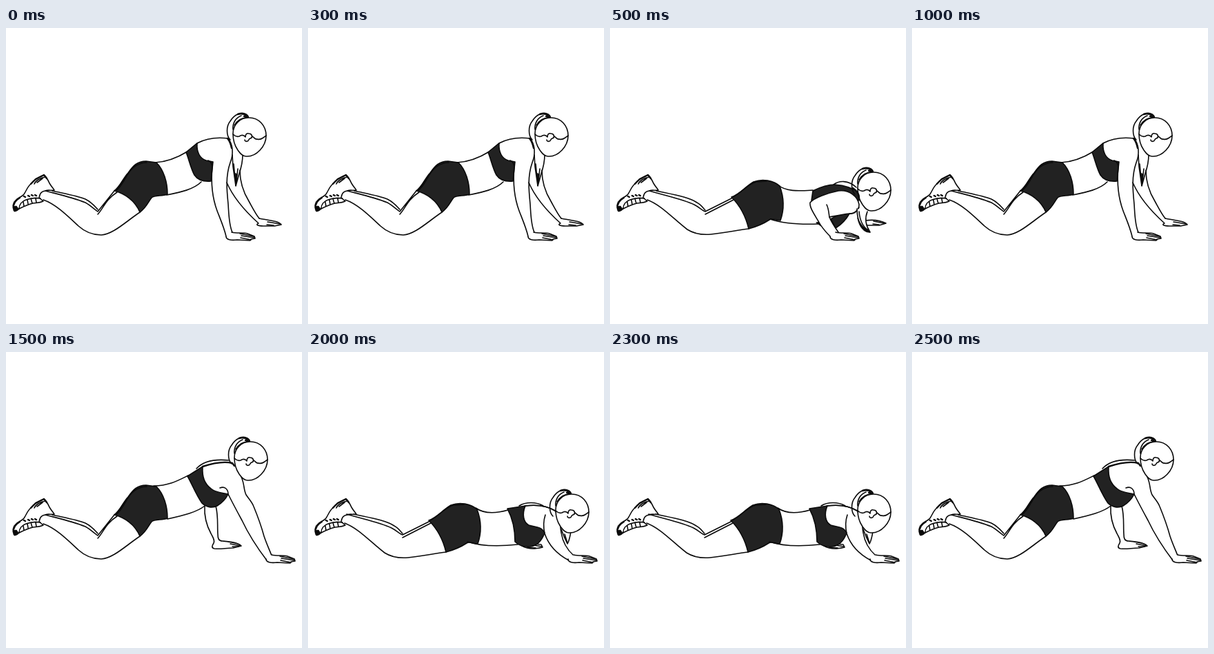
Animation, 429 px wide and 429 px high, one loop 3 s. Source, as an HTML page:

```html
<!DOCTYPE html>
<html lang="en">
<head>
<meta charset="utf-8">
<title>Kneeling push-up</title>
<style>
html, body { margin: 0; width: 100%; height: 100%; overflow: hidden; background: #fff; }
svg { display: block; width: 100vw; height: 100vh; }
path { fill: none; stroke: #0a0a0a; stroke-width: 1.6; stroke-linecap: round; stroke-linejoin: round; }
.skin { fill: #fff; }
.cloth { fill: #222; }
.ink { fill: #0a0a0a; stroke-width: 1; }
.bold { stroke-width: 2.4; }
</style>
</head>
<body>
<svg id="stage" viewBox="0 0 429 429"></svg>
<script>
const path = (d, kind = '') => `<path class="${kind}" d="${d}"/>`;
const move = (x, y, parts) => `<g transform="translate(${x} ${y})">${parts}</g>`;

const shoe =
  path('M12 265C9 259 10 253 14 250C18 245 23 245 26 241C30 235 31 230 36 226C40 220 48 216 55 213C59 216 60 219 63 225C66 230 68 232 70 235C65 236 61 234 57 236C50 237 49 241 48 246L54 251C48 254 44 253 39 254C31 256 25 259 19 262C16 265 14 266 12 265Z', 'skin') +
  path('M11 261C10 254 15 249 20 246M36 226L43 219L55 213L59 218', 'bold') +
  path('M19 262C19 256 23 251 29 249C37 246 44 246 50 247M41 226C43 221 50 217 57 216M45 224L53 218M26 258L25 252M32 255L31 249M38 254L36 247M44 253L43 247') +
  path('M26 244L28 245M32 243L34 244M37 242L39 243M42 242L44 243', 'bold') +
  path('M11 264L11 259L15 258L18 262L13 266Z', 'ink');

const hand =
  path('M319 302C319 307 326 308 335 307L354 308L355 306L361 305L360 302L350 298C343 296 335 298 327 296', 'skin') +
  path('M339 298L359 302M341 301L360 304M340 304L355 307');

const farHand =
  path('M366 283C361 285 365 287 373 287L389 287L399 285C396 280 384 279 367 276', 'skin') +
  path('M379 281L397 284M378 285L388 286');

const head =
  path('M325 162C319 156 319 142 325 135C331 125 341 121 348 125C351 127 352 129 351 131M329 147C328 138 333 130 341 127M331 141C335 134 342 130 349 130') +
  path('M336 125C342 123 348 125 351 131L345 128', 'bold') +
  path('M352 130C367 130 377 142 377 156C377 171 363 187 348 186C342 186 339 181 336 177C331 170 329 162 329 153C329 140 339 130 352 130Z', 'skin') +
  path('M329 154C332 157 335 158 338 157C341 155 344 154 347 158C347 154 349 152 352 153C357 153 358 159 354 160C351 161 352 164 350 164C348 165 346 164 346 162M357 157C360 159 361 162 364 161C369 163 373 159 377 156');

const legsHigh =
  path('M57 236C76 241 98 246 115 253C124 258 129 264 133 266L157 236M67 236C85 240 103 243 115 248C125 253 129 259 133 263M133 270C142 260 144 249 161 238') +
  path('M54 249C72 255 90 273 105 287C115 296 126 300 138 300C155 299 172 282 194 267') +
  path('M157 236C166 229 170 217 177 210C184 200 190 193 203 193L218 195C229 206 234 224 234 241C226 244 215 242 211 246C206 252 204 260 194 267C187 250 172 240 157 236Z', 'cloth') +
  path('M159 236C172 226 173 211 186 201C192 197 198 195 204 195');

const legsLow =
  path('M57 236C80 243 106 248 122 256C130 260 134 265 138 266L178 246M67 236C90 241 115 245 126 253C132 256 135 261 138 264M138 270L181 248') +
  path('M54 249C75 257 91 276 112 292C123 299 134 300 146 299C166 297 184 293 201 291') +
  path('M176 245C188 241 196 230 208 223C221 218 237 221 246 229C252 245 253 262 247 279C240 279 235 275 231 278C222 284 212 288 201 291C197 274 188 257 176 245Z', 'cloth') +
  path('M178 245C192 238 198 227 212 223L227 222');

const narrowHigh = shoe + legsHigh +
  path('M216 195C235 194 250 187 263 179L277 167C290 160 306 158 322 160M233 242C253 238 272 234 283 223') +
  path('M320 224C329 245 346 265 366 283M339 206C339 222 344 238 352 251C358 262 362 270 367 276') +
  farHand +
  path('M328 184L329 201L333 229L338 211C341 202 343 194 343 184M330 197L333 229L336 204') +
  path('M332 211L333 229L335 212Z', 'ink') +
  path('M261 180L277 167C276 180 281 189 290 192L300 194L297 222C285 223 277 219 273 213C268 204 265 190 261 180Z', 'cloth') +
  path('M319 302C316 289 311 278 306 265C299 246 297 222 299 201C299 196 297 194 293 192M322 160C329 169 330 183 325 195C318 215 320 235 322 255C323 270 323 285 328 296') +
  hand + head +
  path('M321 160C325 165 326 169 327 174', 'bold');

const narrowLow = shoe + legsLow +
  path('M243 227C255 238 276 236 294 235M232 277C253 284 277 285 302 284M324 227C332 221 345 220 357 231') +
  path('M292 250L294 236C306 230 317 227 326 227C340 228 351 231 361 239L361 250L345 244Z', 'cloth') +
  path('M299 282L304 281L309 289Z', 'ink') +
  path('M320 277C329 271 339 268 347 269C342 278 335 285 327 290Z', 'cloth') +
  path('M320 303C313 296 306 288 302 280C296 270 289 260 290 253C296 246 316 239 331 236C347 234 359 244 361 256C361 264 354 269 347 269C337 270 328 272 318 274C321 282 326 289 331 296', 'skin') +
  path('M314 256C317 262 317 268 318 274M347 269C352 270 358 267 361 260') +
  hand +
  path('M370 279C377 278 390 278 400 283L390 286L372 286', 'skin') +
  path('M382 280L397 283M381 284L390 285') +
  move(30, 79, head) +
  path('M358 262C358 276 362 291 377 296C371 287 369 276 373 266M361 266C362 278 365 287 374 293', 'skin') +
  path('M359 276C363 285 369 291 377 296C371 297 362 292 359 276Z', 'ink') +
  path('M352 232C358 236 361 241 361 246', 'bold');

const wideHigh = shoe + legsHigh +
  path('M214 194C236 194 250 186 264 179M276 169C287 157 304 155 323 157M234 242C257 237 277 232 288 223') +
  path('M288 223C287 240 291 252 297 263C300 269 303 273 301 277C299 280 297 284 302 285C311 286 319 284 329 284L341 281C336 276 324 275 314 274C308 274 307 270 307 264C306 250 308 239 304 223', 'skin') +
  path('M325 278L340 281M328 282L337 282') +
  path('M263 180L285 166C284 182 288 191 297 198C304 204 314 204 322 206C318 214 313 219 306 223C298 227 289 224 284 219C275 206 270 192 263 180Z', 'cloth') +
  path('M310 197C317 194 322 199 322 206C330 222 336 233 342 244C350 261 362 281 378 302M341 181C346 192 344 199 348 207C352 213 357 218 359 224C366 241 371 256 374 267C378 279 382 287 385 295') +
  move(58, -2, hand) + move(2, 0, head) +
  path('M285 166C300 161 315 158 328 161L331 165', 'bold');

const wideLow = shoe + move(-1, -1, legsLow) +
  path('M243 226C257 236 276 233 290 229M231 275C252 282 277 282 304 279M306 223C315 217 331 217 341 223') +
  path('M310 281C321 287 331 285 340 283L338 279L324 278', 'skin') +
  path('M318 283L330 284M327 280L339 282') +
  path('M289 227L315 223C310 235 312 247 320 251C328 254 338 252 343 262C339 273 332 281 322 282C312 283 304 279 300 275C300 258 296 240 289 227Z', 'cloth') +
  path('M315 223C331 221 347 223 358 230C366 239 365 251 367 262C369 275 375 286 385 295M344 236C341 245 341 254 343 263C349 281 361 293 378 302') +
  move(58, -2, hand) +
  path('M367 257C370 265 373 272 376 278C379 273 380 266 381 260M372 264L376 277') +
  move(30, 76, head) +
  path('M314 223C331 221 347 223 358 230');

const poses = [narrowHigh, narrowLow, narrowHigh, wideHigh, wideLow, wideHigh];
const hold = 500;
const stage = document.getElementById('stage');
const drawings = [...new Set(poses)];
const order = poses.map(p => drawings.indexOf(p));

stage.innerHTML = drawings.map(p => `<g>${p}</g>`).join('');
const layers = [...stage.children];

function draw(ms) {
  const shown = order[Math.floor(ms / hold) % order.length];
  layers.forEach((g, i) => { g.style.display = i === shown ? '' : 'none'; });
}

const start = performance.now();
function tick() {
  draw(performance.now() - start);
  requestAnimationFrame(tick);
}
tick();
</script>
</body>
</html>
```
